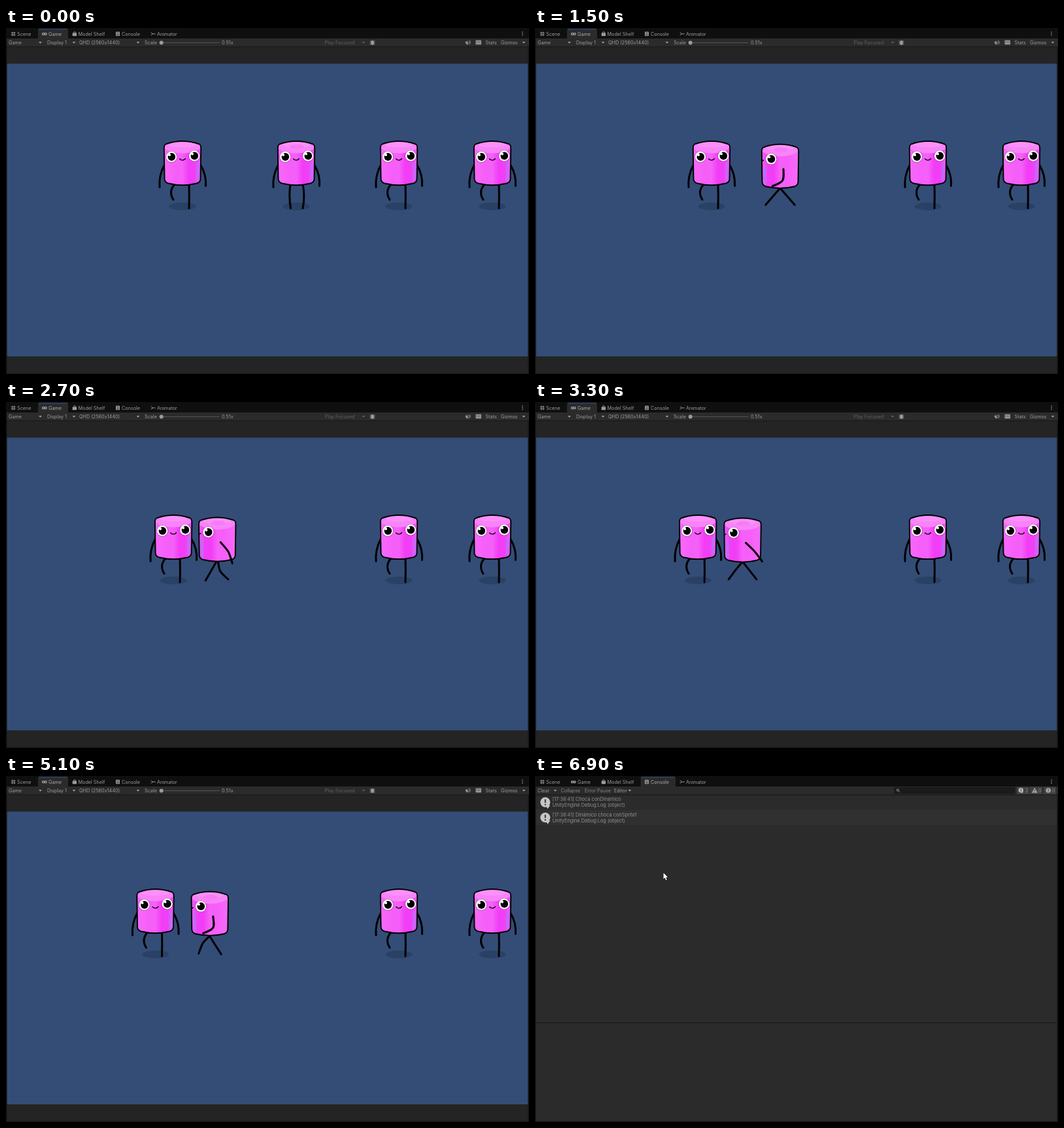
Write an HTML page with a canvas that moves like this. It is 800 px wide and 529 px high and loops after 7000 ms.

```html
<!DOCTYPE html>
<html lang="en">
<head>
<meta charset="utf-8">
<title>Editor play mode</title>
<style>
html, body { margin: 0; width: 100%; height: 100%; overflow: hidden; background: #222; }
canvas { display: block; width: 800px; height: 529px; }
</style>
</head>
<body>
<canvas id="stage" width="800" height="529"></canvas>
<script>
const ctx = document.getElementById('stage').getContext('2d');
const { sin, cos, abs, min, max, floor, PI } = Math;
const LOOP = 7000, STEP = 100;
const WALK_START = 500, HIT = 1960, SWITCH = 5200;
const WALK_SPEED = 0.069, WALK_CYCLE = 330;
const GREY = '#9c9c9c', DIM = '#858585', PANEL = '#2b2b2b';

// ---------- drawing helpers ----------
function rect(x, y, w, h, color) {
  ctx.fillStyle = color;
  ctx.fillRect(x, y, w, h);
}
function box(x, y, w, h, r, color) {
  ctx.fillStyle = color;
  ctx.beginPath();
  ctx.roundRect(x, y, w, h, r);
  ctx.fill();
}
function oval(x, y, rx, ry, color) {
  ctx.fillStyle = color;
  ctx.beginPath();
  ctx.ellipse(x, y, rx, ry, 0, 0, PI * 2);
  ctx.fill();
}
function triangle(x, y, w, h, color) {
  ctx.fillStyle = color;
  ctx.beginPath();
  ctx.moveTo(x - w / 2, y);
  ctx.lineTo(x + w / 2, y);
  ctx.lineTo(x, y + h);
  ctx.fill();
}
function line(x0, y0, x1, y1, color = GREY, width = 0.9) {
  curve(x0, y0, x1, y1, 0, width, color);
}
// Stroke from one point to another, bulging sideways by bend
function curve(x0, y0, x1, y1, bend, width = 3, color = '#000') {
  const len = Math.hypot(x1 - x0, y1 - y0) || 1;
  ctx.strokeStyle = color;
  ctx.lineWidth = width;
  ctx.beginPath();
  ctx.moveTo(x0, y0);
  ctx.quadraticCurveTo(
    (x0 + x1) / 2 + (y1 - y0) / len * bend * 2,
    (y0 + y1) / 2 - (x1 - x0) / len * bend * 2, x1, y1);
  ctx.stroke();
}
function ring(x, y, r, from = 0, to = PI * 2) {
  ctx.strokeStyle = GREY;
  ctx.lineWidth = 0.9;
  ctx.beginPath();
  ctx.arc(x, y, r, from, to);
  ctx.stroke();
}
function text(str, x, y, color = GREY, size = 7.25) {
  ctx.font = `${size}px Inter, "Liberation Sans", sans-serif`;
  ctx.fillStyle = color;
  ctx.fillText(str, x, y);
}
function menu(label, x, arrowX, color = GREY) {
  text(label, x, 24.7, color);
  triangle(arrowX, 21.1, 4.8, 2.7, color);
}

// ---------- motion ----------
const ramp = (t, t0, t1) => min(1, max(0, (t - t0) / (t1 - t0)));
const mix = (a, b, k) => a + (b - a) * k;

// The hit shoves the first figure, which then drifts on slowly
function pushedX(t) {
  return 270 - 7 * ramp(t, HIT, 2100) - 0.0115 * max(0, t - 2100);
}
// Steady walk, then slowing down behind the pushed figure
function walkerX(t) {
  const walk = WALK_SPEED * (min(t, 2100) - WALK_START);
  const glide = 23 * (1 - Math.exp(-max(0, t - 2100) / 1000));
  return 444 - max(0, walk) - glide;
}

// ---------- figures ----------
function bodyPath() {
  ctx.beginPath();
  ctx.moveTo(-25.5, 177.5);
  ctx.quadraticCurveTo(0, 168.5, 25.5, 177.5);
  ctx.quadraticCurveTo(28.5, 179, 28.2, 185);
  ctx.lineTo(27.5, 231);
  ctx.quadraticCurveTo(27, 236, 22, 237.5);
  ctx.quadraticCurveTo(0, 243, -22, 237.5);
  ctx.quadraticCurveTo(-27, 236, -27.5, 231);
  ctx.lineTo(-28.2, 185);
  ctx.quadraticCurveTo(-28.5, 179, -25.5, 177.5);
  ctx.closePath();
}
function body(facing, dimple) {
  const skin = ctx.createLinearGradient(-28 * facing, 0, 28 * facing, 0);
  ['#f16cf4', '#f863fa', '#f55ef8', '#f561f8', '#f23df6', '#f13ff6', '#ec5ff6']
    .forEach((tone, i) => skin.addColorStop(i / 6, tone));
  ctx.save();
  bodyPath();
  ctx.fillStyle = skin;
  ctx.fill();
  ctx.clip();
  oval(0, 181, 28, 10.5, '#f983f9');
  oval(0, 178, 22, 5, '#fb90fa');
  if (dimple) oval(1, 181.5, 11, 3.5, '#f47cf4');
  curve(23.5 * facing, 208, 22.5 * facing, 232, 0, 4, 'rgba(176,116,248,.75)');
  ctx.restore();
  bodyPath();
  ctx.strokeStyle = '#000';
  ctx.lineWidth = 1.9;
  ctx.stroke();
}
function eye(x, y) {
  oval(x, y, 8.6, 8.8, 'rgba(20,0,20,.4)');
  oval(x, y, 8.1, 8.3, '#fff');
  oval(x + 0.3, y, 5.8, 6, '#000');
  oval(x - 3, y - 3, 2, 1.9, '#fff');
}
function shadow(alpha) {
  ctx.globalAlpha = alpha;
  oval(0, 272.8, 20.5, 6, '#2a4166');
  ctx.globalAlpha = 1;
}
function frontFigure(x, bothFeet) {
  ctx.save();
  ctx.translate(x, 0);
  shadow(1);
  curve(-28, 210, -35, 243.5, -2.5);
  curve(28, 210, 35.5, 241.5, 2.5);
  if (bothFeet) curve(-9, 239, -8.5, 275.5, -1.5);
  else curve(-12, 239, -14, 262.5, -4.5);
  curve(10, 239, 10, 275.5, bothFeet ? 1.8 : 0.3);
  body(1, bothFeet);
  eye(-17, 197);
  eye(18, 195.5);
  curve(-4.5, 200, 4.5, 199.8, -2.3, 1.3);
  ctx.restore();
}
// Two-part limb, angles measured from straight down
function limb(x, y, upper, lower, a, b) {
  const kx = x + upper * sin(a), ky = y + upper * cos(a);
  ctx.strokeStyle = '#000';
  ctx.lineWidth = 3;
  ctx.beginPath();
  ctx.moveTo(x, y);
  ctx.bezierCurveTo(kx, ky, kx, ky, kx + lower * sin(b), ky + lower * cos(b));
  ctx.stroke();
}
function leg(x, y, phase) {
  const swing = -0.72 * cos(phase);
  const lift = max(0, -sin(phase)) ** 3;
  limb(x, y, 16, 18, swing - 1.2 * lift, swing + lift);
}
function sideFigure(x, t) {
  const phase = (t - 1010) / WALK_CYCLE * 2 * PI;
  const stride = abs(cos(phase));
  const drop = 4.8 * stride;
  const spread = 4 * (1 - stride);
  ctx.save();
  ctx.translate(x, 0);
  shadow(max(0, 1 - 1.3 * stride));
  ctx.translate(0, drop);
  leg(spread, 240, phase + PI);
  leg(-spread, 240, phase);
  body(-1, true);
  eye(-13.8, 195.5);
  line(-28, 198.5, -25.5, 197.5, '#000', 1.5);
  limb(5, 211, 19, 19, 0.45 + 0.4 * cos(phase), max(-1.2, 1.7 * cos(phase) - 0.95));
  ctx.restore();
}

// ---------- editor ----------
function exclaim(x, y, h, color) {
  box(x - h * 0.1, y - h / 2, h * 0.2, h * 0.62, h * 0.08, color);
  oval(x, y + h * 0.4, h * 0.12, h * 0.12, color);
}
function bubble(x, y, r, color) {
  oval(x, y, r, r, color);
  triangle(x + r * 0.5, y + r * 0.6, r, r * 0.7, color);
  exclaim(x, y, r * 1.2, PANEL);
}
function tabIcons() {
  for (const d of [-1.5, 1.5]) {
    line(8.2, 9 + d, 14.2, 9 + d);
    line(11.2 + d, 6, 11.2 + d, 12);
    line(222, 9 + d * 1.3, 224.5, 9);
    oval(58.8 + d * 1.2, 9.1, 2.2, 2.2, GREY);
    oval(58.8 + d * 1.2, 9.1, 0.8, 0.8, '#222');
  }
  line(224.5, 9, 228.5, 9);
  box(101.7, 7.5, 6.4, 4.8, 0.6, GREY);
  ring(104.9, 7.5, 1.8, PI, 0);
  box(168, 5.8, 6, 6.4, 0.6, GREY);
  for (let i = 0; i < 3; i++) {
    rect(169.2, 7.3 + i * 1.7, 3.6, 0.7, '#242424');
    oval(790, 6.2 + i * 2.5, 0.8, 0.8, GREY);
  }
}
function header(active, left, width) {
  rect(0, 0, 800, 16, '#0f0f0f');
  box(left, 1.5, width, 15, [2, 2, 0, 0], PANEL);
  rect(left + 1, 1.3, width - 2, 1, '#2b588c');
  const tabs = { Scene: 17, Game: 65, 'Model Shelf': 110.5, Console: 177, Animator: 231 };
  for (const name in tabs) text(name, tabs[name], 11.7, name === active ? '#aaa' : GREY);
  tabIcons();
  rect(0, 16, 800, 12.5, PANEL);
  rect(0, 28.2, 800, 1.2, '#1a1a1a');
}
function frameEdges() {
  rect(0, 16, 1.3, 513, '#111');
  rect(798.5, 28, 1.5, 501, '#161616');
  rect(0, 527.8, 800, 1.2, '#171717');
}
function gameBar() {
  menu('Game', 4, 52.5);
  menu('Display 1', 63, 104);
  menu('QHD (2560x1440)', 112, 202);
  text('Scale', 212, 24.7);
  rect(238, 22, 88.5, 0.9, '#5a5a5a');
  oval(237.7, 22.5, 3, 3, '#9a9a9a');
  text('0.51x', 330, 24.7);
  menu('Play Focused', 487.5, 547, '#606060');
  text('Stats', 733.5, 24.7);
  menu('Gizmos', 757, 792);
  oval(560.5, 22.6, 2.4, 3.3, GREY);
  for (let d = -1; d < 2; d++) line(557, 22.5 + d * 2.4, 564, 22.5 + d * 2.4, GREY, 0.8);
  rect(702.8, 20.7, 2, 2.6, GREY);
  triangle(705.5, 25, 3, -6, GREY);
  ring(706.5, 22, 2, -0.9, 0.9);
  ring(706.5, 22, 3.8, -0.9, 0.9);
  box(718.5, 18.8, 8.5, 6.4, 0.8, GREY);
  for (let i = 0; i < 6; i++) rect(719.8 + i % 3 * 2.3, 20.2 + floor(i / 3) * 1.9, 1.1, 0.9, PANEL);
}
function gameView(t) {
  rect(0, 0, 800, 529, '#242424');
  header('Game', 49, 46);
  gameBar();
  rect(1.5, 54.5, 797, 447.5, '#334d76');
  frameEdges();
  frontFigure(pushedX(t));
  if (t <= WALK_START) frontFigure(walkerX(t), true);
  else sideFigure(walkerX(t), t);
  frontFigure(601);
  frontFigure(744);
}
function logRow(y, message) {
  bubble(15.7, y + 11.3, 7.6, '#c6c6c6');
  text(message, 26.7, y + 9.4, '#909090', 7.35);
  text('UnityEngine.Debug:Log (object)', 26.7, y + 18.3, '#909090', 7.35);
}
function counters() {
  for (const [x, n] of [[737, 2], [757, 0], [778, 0]]) {
    rect(x, 16.5, 18.8, 11.5, '#414141');
    text(n, x + 13, 24.7, DIM);
  }
  bubble(743.3, 21.8, 3.7, '#b5b5b5');
  triangle(764.3, 25.7, 8.6, -8, '#a5a5a5');
  exclaim(764.3, 22.8, 4.4, '#333');
  oval(785.2, 22, 3.8, 3.8, '#a5a5a5');
  exclaim(785.2, 22, 5, '#333');
}
function consoleView() {
  rect(0, 0, 800, 529, PANEL);
  header('Console', 161.5, 53.5);
  menu('Clear', 4, 31);
  text('Collapse', 39.5, 24.7, DIM);
  text('Error Pause', 76, 24.7, DIM);
  menu('Editor', 121, 145);
  box(549.5, 17, 185, 10.3, 2, '#1b1b1b');
  ring(554.8, 21.5, 1.6);
  line(556, 22.7, 557.6, 24.4);
  counters();
  rect(1, 51.8, 797, 23.4, '#303030');
  logRow(28.8, '[17:38:41] Choca conDinamico');
  logRow(52.2, '[17:38:41] Dinámico choca conSprite1');
  rect(1, 376.8, 797, 1, '#171717');
  frameEdges();
}
function pointer(t) {
  const settle = ramp(t, 5200, 5400), drop = ramp(t, 5900, 6200);
  ctx.save();
  ctx.translate(mix(203, 198.5, settle) - 2 * drop, mix(9, 11, settle) + 137 * drop);
  const arrow = new Path2D('M0 0V9.5L2.1 7.6L3.7 11.2L5.3 10.4L3.8 7L6.6 6.8Z');
  ctx.strokeStyle = '#111';
  ctx.lineWidth = 1.2;
  ctx.stroke(arrow);
  ctx.fillStyle = '#fff';
  ctx.fill(arrow);
  ctx.restore();
}

const start = performance.now();
function draw(now) {
  const t = floor(max(0, now - start) % LOOP / STEP) * STEP;
  ctx.lineCap = ctx.lineJoin = 'round';
  if (t < SWITCH) gameView(t);
  else {
    consoleView();
    pointer(t);
  }
  requestAnimationFrame(draw);
}
draw(start);
</script>
</body>
</html>
```
